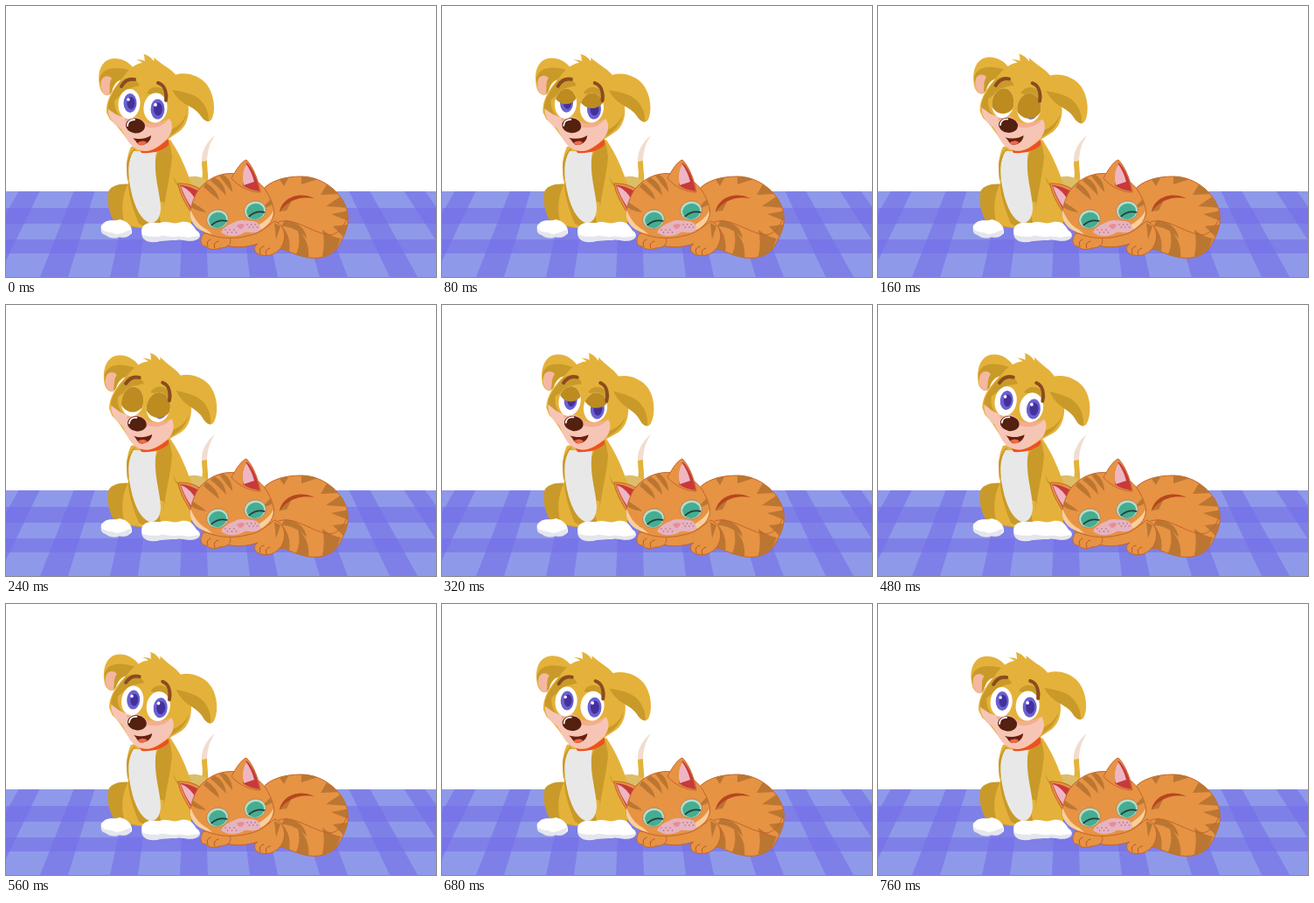
An HTML page that plays this animation: 492 by 310 pixels, repeating every 0.8 s.

```html
<!DOCTYPE html>
<html lang="en">
<head>
<meta charset="utf-8">
<title>Puppy and kitten</title>
<style>
  html, body { margin: 0; width: 100%; height: 100%; overflow: hidden; background: #fff; }
  svg { display: block; width: 100vw; height: 100vh; }
  .gold { fill: #e4b23a; }
  .shade { fill: #c99a29; }
  .lid { fill: #bd8b20; }
  .pink { fill: #f7c5b5; }
  .fur { fill: #e69344; stroke: #c5642a; stroke-width: 1; }
  .stripe { fill: #bb7632; }
  .line { fill: none; stroke-linecap: round; stroke-linejoin: round; }
</style>
</head>
<body>
<svg viewBox="0 0 492 310">
  <defs>
    <clipPath id="floorClip"><path d="M0 212H492V310H0Z"/></clipPath>
    <clipPath id="eyeL"><ellipse cx="141" cy="112" rx="12.5" ry="17" transform="rotate(5 141 112)"/></clipPath>
    <clipPath id="eyeR"><ellipse cx="171" cy="116.5" rx="13.5" ry="17" transform="rotate(5 171 116.5)"/></clipPath>
    <clipPath id="bodyClip"><path id="bodyShape" d="M292 212C302 199 320 195 338 195C364 195 388 216 391 238C393 253 386 264 382 272C376 285 361 290 347 288C334 286 327 282 319 279L290 274L288 250Z"/></clipPath>
  </defs>

  <g clip-path="url(#floorClip)">
    <path fill="#8f99e9" d="M0 212H492V310H0Z"/>
    <path fill="#7f7fe8" d="M0 231H492V249H0ZM0 267H492V283H0Z"/>
    <g id="stripes" fill="#7470e8" opacity=".6"></g>
  </g>

  <g id="dogBody">
    <path fill="#f1ddcf" d="M239 148C230 155 223 166 224 179L230 178C230 167 233 157 239 148Z"/>
    <path class="gold" d="M224 178C224 188 227 194 222 202L231 205C232 194 230 187 230 177Z"/>
    <path fill="#dcbd68" d="M203 198C213 192 229 194 232 205L226 214L207 212Z"/>
    <path class="shade" d="M145 204C132 202 119 205 117 213C115 227 119 240 126 250L152 254Z"/>
    <path class="gold" d="M143 161C137 173 137 190 140 203C133 216 131 233 136 250L160 255L212 252L213 206C207 188 199 169 188 153Z"/>
    <path class="shade" d="M187 155C174 162 167 174 169 201L177 248L164 255L152 249C145 232 140 216 140 203L147 188L178 184C182 206 181 225 180 238C182 216 189 190 190 172ZM138 183C138 174 143 166 148 162L144 190L139 200Z"/>
    <path class="shade" d="M169 180L189 174C188 192 184 206 181 225L172 222ZM191 193C195 207 205 209 213 208L213 212C201 213 193 206 191 193Z"/>
    <path fill="#e8e8e8" d="M146 166C139 177 139 192 143 211C147 230 154 244 164 248C173 249 177 241 177 230C176 211 168 192 172 167Z"/>
    <path fill="#fff" d="M112 248C118 243 125 247 130 244C138 246 145 251 144 260C138 266 127 264 121 264C114 263 107 259 109 251ZM156 253C161 246 170 248 176 248C185 245 191 250 197 248C209 244 214 250 218 257C225 261 222 268 212 268C205 269 200 266 194 268C185 268 179 267 172 270C161 271 152 263 156 253Z"/>
    <path fill="#e5e5ed" d="M109 255C115 260 121 258 126 261C132 261 138 257 143 256C144 265 134 266 130 264C124 267 117 265 114 262C110 261 108 258 109 255ZM155 261C163 265 169 263 174 264C181 261 187 265 193 264C200 262 207 266 213 264L222 263C219 271 208 269 198 267C187 269 178 268 172 270C161 271 156 267 155 261Z"/>
    <path fill="#ee4f24" d="M153 164C165 166 177 161 186 149L186 159C179 166 167 169 155 168Z"/>
  </g>

  <g id="head">
    <path class="gold" d="M146 71C137 59 121 57 113 64C105 71 105 85 108 95C111 103 119 105 121 98C124 89 127 85 135 84Z"/>
    <path class="shade" d="M107 84C110 69 127 69 144 74L134 84C126 84 123 90 121 98C117 104 109 98 107 84Z"/>
    <path fill="#f4b7a0" d="M109 85C111 79 119 79 121 83C117 89 120 95 118 102C111 103 107 94 109 85Z"/>
    <path class="gold" d="M115 122C114 108 122 95 132 84C140 72 148 66 156 65C154 63 151 62 149 62C153 61 156 62 159 63C158 59 159 57 157 55C163 56 167 60 169 63C170 62 169 60 169 59C174 63 178 66 184 70C196 77 203 91 206 103C211 117 210 134 199 143L183 154C172 164 162 169 152 164C140 159 133 141 119 130Z"/>
    <path class="shade" d="M131 86C140 79 149 82 153 91C144 93 135 95 130 103L124 108C124 116 126 122 131 126L118 122C114 113 119 103 131 86ZM161 100C165 91 178 89 186 102L183 113C175 103 168 101 161 100ZM207 122C204 137 196 144 185 150L185 143C196 139 203 133 207 122Z"/>
    <path class="pink" d="M117 118C123 122 128 126 134 127C142 124 150 126 157 132C165 138 177 134 187 129C192 135 190 146 185 151C176 160 165 169 153 165C140 161 137 148 131 140C123 135 117 128 117 118Z"/>
    <path fill="#f4ad91" d="M136 128C142 124 152 126 158 132C167 136 179 133 186 129C181 138 168 141 158 138C152 132 143 130 136 132Z"/>
    <path class="gold" d="M187 82C199 73 220 77 230 90C238 101 240 118 236 128C234 133 230 133 227 129C219 116 204 114 192 100Z"/>
    <path class="shade" d="M190 96C200 98 218 99 226 112C231 119 232 126 232 132C228 132 225 129 223 126C215 113 200 115 190 96Z"/>

    <g clip-path="url(#eyeL)">
      <path fill="#fff" d="M120 90H160V135H120Z"/>
      <ellipse cx="142" cy="111" rx="7.5" ry="11" fill="#6b60d0"/>
      <ellipse cx="143" cy="111" rx="4.5" ry="7" fill="#43309a"/>
      <circle cx="140" cy="107" r="1.8" fill="#fff"/>
      <ellipse class="lid" cx="141" cy="112" rx="15" ry="17"/>
    </g>
    <g clip-path="url(#eyeR)">
      <path fill="#fff" d="M150 95H190V140H150Z"/>
      <ellipse cx="173.5" cy="118" rx="8" ry="11.5" fill="#6b60d0"/>
      <ellipse cx="174" cy="118" rx="5" ry="7.5" fill="#43309a"/>
      <circle cx="171" cy="113" r="1.9" fill="#fff"/>
      <ellipse class="lid" cx="171" cy="116.5" rx="16" ry="17"/>
    </g>
    <path class="line" stroke="#8b4b20" stroke-width="4" d="M132 92C136 85 142 83 147 84M174 88C181 90 184 98 183 108"/>

    <ellipse cx="148" cy="137" rx="11" ry="8.5" fill="#54200f" transform="rotate(5 148 137)"/>
    <path class="line" stroke="#fff" stroke-width="1.8" d="M139 137C139 133 142 130 147 130"/>
    <path fill="#67200f" d="M145 151C152 153 160 152 166 148C166 155 159 160 153 159C149 157 149 154 145 151Z"/>
    <path fill="#ee6a48" d="M150 157C154 154 158 154 161 156C158 160 153 160 150 157Z"/>
  </g>

  <g id="cat">
    <use href="#bodyShape" class="fur"/>
    <g class="stripe" clip-path="url(#bodyClip)">
      <path d="M312 197L324 195L318 206ZM338 194L357 198L338 204ZM367 204L382 215L360 216ZM384 217L392 231L366 229ZM393 234L392 246L372 238ZM391 250L386 264L374 252ZM383 266Q372 264 362 256Q366 272 361 290L376 283ZM346 289L331 286Q338 272 334 257Q348 268 346 289ZM324 282L312 278Q318 265 315 251Q327 263 324 282ZM313 235C318 230 320 226 327 222L321 234ZM319 245C332 246 343 254 344 266C336 257 326 252 315 252Z"/>
    </g>
    <path fill="#b8461f" d="M313 236C315 221 333 211 353 220C336 217 321 223 313 236Z"/>
    <path class="line" stroke="#c5642a" d="M312 247C331 241 350 260 371 262C380 261 387 252 390 243"/>
    <path class="fur" d="M255 262C274 267 294 258 307 246C319 250 322 264 315 276C308 285 299 288 289 284C283 281 283 275 288 272C276 276 263 277 253 274Z"/>
    <path class="stripe" d="M307 248L314 252L309 267Z"/>
    <path class="fur" d="M226 260C236 260 247 262 256 265C259 272 254 277 244 277C238 280 231 278 229 275C222 275 221 267 226 260Z"/>
    <path class="line" stroke="#b9561f" d="M231 275C229 271 231 268 234 267M239 277C237 273 239 270 243 269M291 283C289 279 291 276 295 275M298 285C296 281 298 278 302 277"/>

    <path class="fur" d="M213 238C205 226 198 213 197 203C207 203 217 205 224 211Z"/>
    <path fill="#c8393a" d="M199 205C207 205 216 209 222 213L218 229L213 235C207 224 202 215 199 205Z"/>
    <path fill="#eeb6c2" d="M200 206C206 208 212 213 216 220L212 230C207 223 203 215 200 206Z"/>
    <path class="fur" d="M211 235C213 224 217 213 223 207C234 195 249 190 263 192C279 193 292 202 298 212C304 222 308 233 306 240C302 253 289 261 276 263C258 268 235 265 224 257C215 251 210 244 211 235Z"/>
    <path fill="#f9cf9c" d="M211 233C215 242 220 251 230 256L236 261C230 260 226 258 222 256C213 250 209 242 211 233ZM306 234C302 242 296 246 290 250L288 257C297 254 306 247 306 234Z"/>
    <path class="fur" d="M258 197C263 188 269 178 275 176C283 184 289 200 291 213C281 213 267 208 258 197Z"/>
    <path fill="#c8393a" d="M275 179C284 187 289 203 290 212C283 211 276 209 271 205Z"/>
    <path fill="#eeb6c2" d="M275 181C279 187 282 193 284 201L272 205C270 196 271 188 275 181Z"/>
    <path class="stripe" d="M229 202C236 207 242 212 244 222C237 217 231 211 226 207ZM238 196C246 200 251 207 252 217C246 211 241 205 234 200ZM249 193C255 197 259 204 259 213C254 207 249 201 244 194ZM213 224C219 229 225 231 229 236C221 235 216 233 212 230ZM305 227C300 229 297 232 293 231C297 228 299 224 303 221Z"/>
    <g id="catEyes"></g>
    <path fill="#e6b3c0" d="M246 259C249 252 258 249 264 246C270 244 276 246 282 246C289 247 293 253 290 257C284 261 279 258 273 259C266 264 254 265 246 259Z"/>
    <path fill="#e58d98" d="M264 251C267 249 271 249 273 250C272 253 270 255 268 255C266 254 265 253 264 251Z"/>
    <g id="freckles" fill="#a65a78"></g>
  </g>
</svg>
<script>
const LOOP = 800, STEP = 40, BLINK = 400;
const byId = id => document.getElementById(id);
const head = byId('head');
const lids = document.querySelectorAll('.lid');

// Checked cloth: stripes spread towards the viewer.
let cloth = '';
for (let k = -4.5; k <= 4.5; k++) {
  const far = 247 + k * 63, near = 255 + k * 80;
  cloth += `<path d="M${far - 12} 212H${far + 12}L${near + 16} 310H${near - 16}Z"/>`;
}
byId('stripes').innerHTML = cloth;

const catEye = (x, y) => `<g transform="translate(${x} ${y}) rotate(-12)">
  <ellipse rx="12.5" ry="11" fill="#b6dccb" stroke="#b9713d" stroke-width=".7"/>
  <ellipse cy="1" rx="10" ry="9" fill="#45ad91"/>
  <path class="line" stroke="#263c3d" stroke-width="1.7" d="M-8 5Q1 0 10 4"/></g>`;
byId('catEyes').innerHTML = catEye(242, 244) + catEye(285, 234);

const freckle = (x, y) => `<circle cx="${x}" cy="${y}" r=".7"/>`;
let dots = '';
for (let i = 0; i < 6; i++) {
  dots += freckle(251 + i * 2.5, 256 + i % 2 * 3) + freckle(276 + i * 2.3, 250 + i % 2 * 3);
}
byId('freckles').innerHTML = dots;

function draw(now) {
  const t = Math.floor(now % LOOP / STEP) * STEP;
  const tilt = 3 * (1 - Math.cos(t / LOOP * 2 * Math.PI));
  const closed = t < BLINK ? 0.9 * Math.sin(t / BLINK * Math.PI) : 0;
  head.setAttribute('transform', `rotate(${tilt} 165 165)`);
  for (const lid of lids) lid.setAttribute('transform', `translate(0 ${-35 * (1 - closed)})`);
  requestAnimationFrame(draw);
}
draw(performance.now());
</script>
</body>
</html>
```
